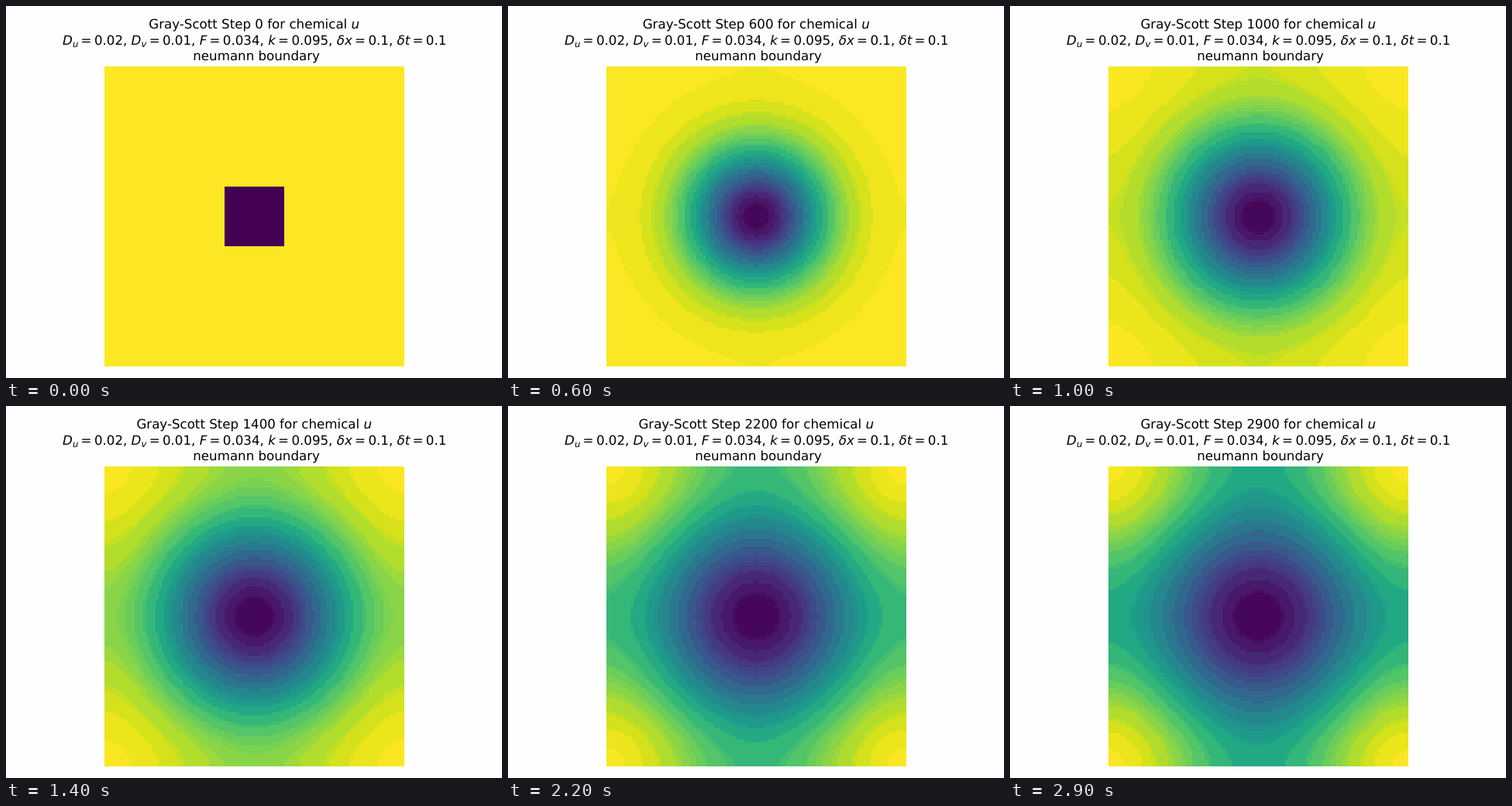
Animation of 640x480 px, one loop 3 s. Source, as an HTML page with a canvas:

```html
<!DOCTYPE html>
<html lang="en">
<head>
<meta charset="utf-8">
<title>Gray-Scott</title>
<style>
  html, body { margin: 0; width: 100%; height: 100%; overflow: hidden; background: #fefefe; }
  canvas { position: absolute; left: 127px; top: 78px; width: 387px; height: 387px; image-rendering: pixelated; }
  svg { position: absolute; left: 0; top: 0; }
  text { font: 16.667px "DejaVu Sans", sans-serif; text-anchor: middle; text-rendering: geometricPrecision; white-space: pre; }
  .i { font-style: italic; }
  .sub { font-size: 11.667px; }
</style>
</head>
<body>
<canvas id="field" width="100" height="100"></canvas>
<svg width="640" height="480">
  <text x="320.2" y="29">Gray-Scott Step <tspan id="step">0</tspan> for chemical <tspan class="i">u</tspan></text>
  <text id="params" x="320.7" y="50"></text>
  <text x="323.1" y="70">neumann boundary</text>
</svg>
<script>
const Du = 0.02, Dv = 0.01, F = 0.034, K = 0.095, DX = 0.1, DT = 0.1;
const N = 100, H = N / 2, FRAMES = 30, FRAME_MS = 100, STEPS = 100;

// Viridis, one stop every 8 of 256 levels
const stops = ('440154 470d5f 48186a 482374 472d7b 453781 424086 3e4989 3b528b 375b8d 33638d ' +
  '2f6b8e 2c728e 297a8e 26828e 23898e 21918c 1f988b 1fa088 22a785 28ae80 32b67a 3fbc73 ' +
  '4ec36b 5ec962 70cf57 84d44b 98d83e addc30 c2df23 d8e219 ece51a ffe725').split(' ')
  .map(h => [0, 2, 4].map(i => parseInt(h.slice(i, i + 2), 16)));

const levels = Array.from({ length: 256 }, (_, n) => {
  const a = stops[n >> 3], b = stops[(n >> 3) + 1], f = (n & 7) / 8;
  return a.map((c, i) => c + (b[i] - c) * f);
});
const bins = levels.map(([r, g, b]) => (r >> 5) << 8 | (g >> 4) << 4 | b >> 5);

// The field is mirror-symmetric, so one quadrant with closed edges is enough.
let u = new Float64Array(H * H).fill(1), v = new Float64Array(H * H);
let u2 = new Float64Array(H * H), v2 = new Float64Array(H * H);
for (let y = 0; y < 10; y++) for (let x = 0; x < 10; x++) {
  u[y * H + x] = 0;
  v[y * H + x] = 1;
}

function react() {
  const s = 1 / (DX * DX);
  for (let y = 0, p = 0; y < H; y++) for (let x = 0; x < H; x++, p++) {
    const l = x ? p - 1 : p, r = x < H - 1 ? p + 1 : p;
    const t = y ? p - H : p, b = y < H - 1 ? p + H : p;
    const a = u[p], c = v[p], q = a * c * c;
    u2[p] = a + DT * (Du * s * (u[l] + u[r] + u[t] + u[b] - 4 * a) - q + F * (1 - a));
    v2[p] = c + DT * (Dv * s * (v[l] + v[r] + v[t] + v[b] - 4 * c) + q - (F + K) * c);
  }
  [u, u2, v, v2] = [u2, u, v2, v];
}

// Colours sharing a bin merge into their mean.
function paint() {
  let lo = Infinity, hi = -Infinity;
  for (const a of u) { lo = Math.min(lo, a); hi = Math.max(hi, a); }
  const idx = Array.from(u, a => Math.min(255, Math.floor((a - lo) / (hi - lo) * 256)));
  const sums = {};
  for (const n of idx) {
    const s = sums[bins[n]] ||= [0, 0, 0, 0];
    levels[n].forEach((c, i) => s[i] += c);
    s[3]++;
  }
  const img = new ImageData(N, N);
  const fold = i => i < H ? H - 1 - i : i - H;
  for (let y = 0; y < N; y++) for (let x = 0; x < N; x++) {
    const s = sums[bins[idx[fold(y) * H + fold(x)]]];
    img.data.set([s[0] / s[3], s[1] / s[3], s[2] / s[3], 255], (y * N + x) * 4);
  }
  return img;
}

const frames = [];
for (let f = 0; f < FRAMES; f++) {
  if (f) for (let i = 0; i < STEPS; i++) react();
  frames.push(paint());
}

const it = s => `<tspan class="i">${s}</tspan>`;
const sub = s => `<tspan class="i sub" dy="2.7">${s}</tspan>`;
const eq = (name, val, dy = 0) =>
  `${name}<tspan dx="3.33" dy="${dy}">=</tspan><tspan dx="3.33">${val}</tspan>`;
document.getElementById('params').innerHTML = [
  eq(it('D') + sub('u'), Du, -2.7), eq(it('D') + sub('v'), Dv, -2.7),
  eq(it('F'), F), eq(it('k'), K), eq(it('δx'), DX), eq(it('δt'), DT)
].join(', ');

const ctx = document.getElementById('field').getContext('2d');
const label = document.getElementById('step');
let shown = -1;
function draw() {
  const f = Math.floor(performance.now() / FRAME_MS) % FRAMES;
  if (f !== shown) {
    shown = f;
    ctx.putImageData(frames[f], 0, 0);
    label.textContent = f * STEPS;
  }
  requestAnimationFrame(draw);
}
draw();
</script>
</body>
</html>
```
